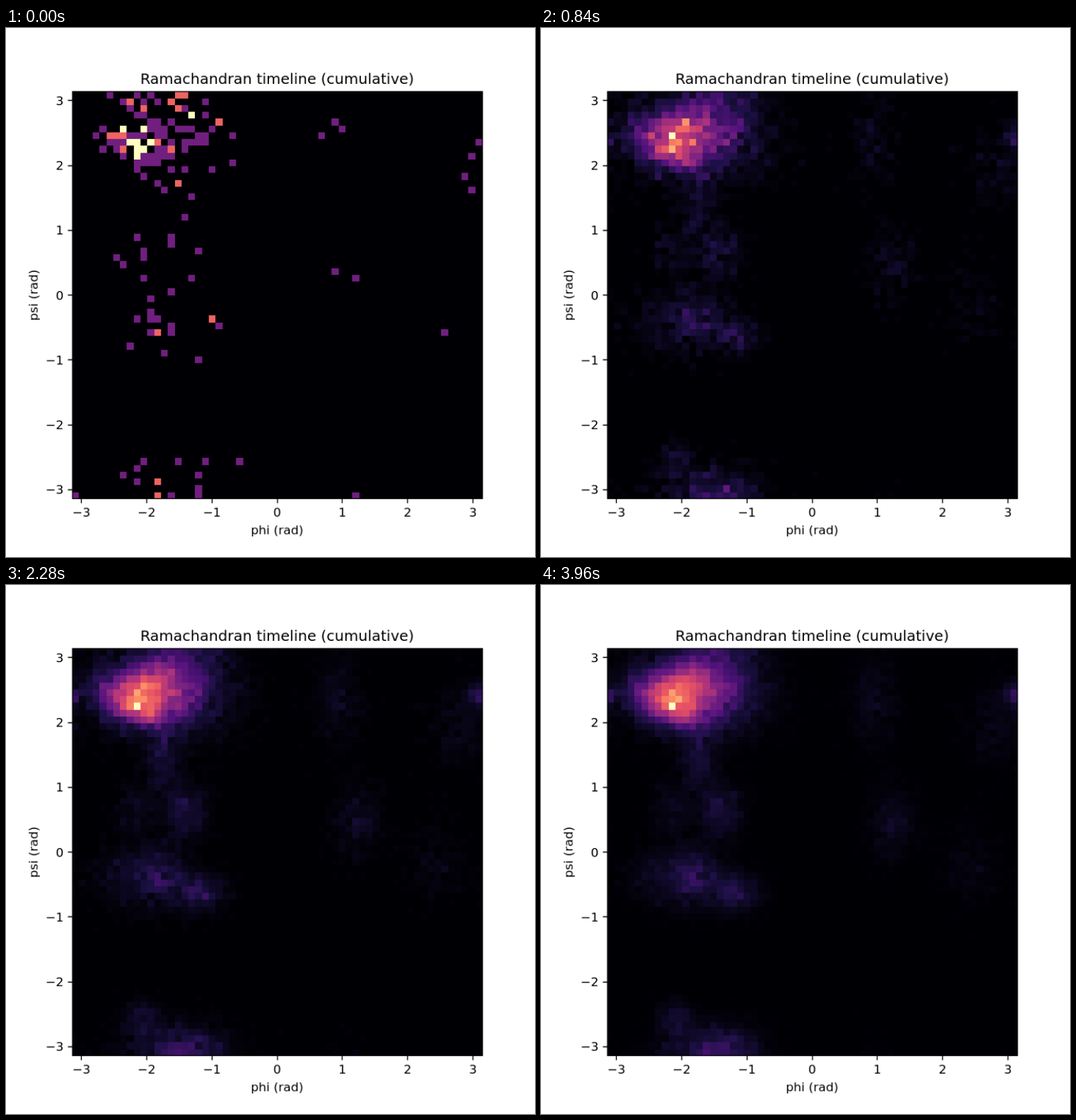
Recreate the animation shown at these times as an HTML page with a canvas. Size 748 by 748 pixels, loop 4.08 s.

```html
<!DOCTYPE html>
<html lang="en">
<head>
<meta charset="utf-8">
<title>Cumulative density</title>
<style>
html, body { margin: 0; width: 100%; height: 100%; overflow: hidden; background: #fff; }
canvas { display: block; width: 748px; height: 748px; }
</style>
</head>
<body>
<canvas id="stage" width="720" height="720"></canvas>
<script>
const ctx = document.getElementById('stage').getContext('2d');
const BINS = 60, STEPS = 34, STEP_MS = 120;
const FIRST_RATE = 1.6, FIRST_CAP = 3, RATE = 8;
const LEFT = 90, TOP = 86.4, WIDTH = 558, HEIGHT = 554.4;

// Density blobs in bins: weight, column, row, column spread, row spread
const blobs = [
  // main basin with its lobes and the hottest bin
  [.4, 12, 5.6, 4.2, 3.4], [.5, 8.2, 6.8, 2.6, 2], [.2, 11, 9.5, 2, 1.5], [.15, 11, 3.3, 2, 1.5],
  [.12, 17, 5, 4, 4], [.14, 4, 5.2, 1.6, 2.2], [.25, 9, 8, .3, .3],
  // bridge and lower basin
  [.1, 12.8, 16, 1.6, 3], [.12, 16, 23.5, 1.8, 2.5], [.05, 9, 23, 1.7, 2.5],
  [.14, 12.5, 33, 2.2, 2.5], [.14, 18, 35.3, 2.4, 1.8], [.07, 8, 33, 3, 2.5],
  // bottom edge
  [.1, 9.5, 54.5, 1.6, 1.8], [.14, 16, 58.2, 3, 2],
  // faint right half
  [.06, 41.2, 25.3, 1.9, 3], [.04, 38.5, 7, 2, 4], [.17, 59.3, 6.3, 1.2, 1.1],
  [.03, 56, 11, 2.5, 3.5], [.02, 53, 31, 2.5, 3.5]
];

let seed = 20177;
function random() {
  seed = (seed + 0x6D2B79F5) | 0;
  let t = Math.imul(seed ^ (seed >>> 15), 1 | seed);
  t = (t + Math.imul(t ^ (t >>> 7), 61 | t)) ^ t;
  return ((t ^ (t >>> 14)) >>> 0) / 4294967296;
}

function poisson(mean) {
  const limit = Math.exp(-mean);
  let n = 0;
  for (let p = random(); p > limit; p *= random()) n++;
  return n;
}

// Both angles are periodic, so distances wrap around the plot
function wrapped(a, b) {
  const d = Math.abs(a - b);
  return Math.min(d, BINS - d);
}

const density = Array.from({ length: BINS * BINS }, (_, i) => {
  const col = i % BINS, row = Math.floor(i / BINS);
  return blobs.reduce((sum, [weight, x, y, sx, sy]) =>
    sum + weight * Math.exp(-((wrapped(col, x) / sx) ** 2 + (wrapped(row, y) / sy) ** 2) / 2), 0);
});

const history = [density.map(d => Math.min(FIRST_CAP, poisson(FIRST_RATE * d)))];
for (let k = 1; k < STEPS; k++) {
  history.push(history[k - 1].map((n, i) => n + poisson(RATE * density[i])));
}

const ramp = ['#000004', '#1c1044', '#51127c', '#812581', '#b73779', '#e75263', '#fc8961', '#fec287', '#fcfdbf']
  .map(hex => [1, 3, 5].map(i => parseInt(hex.slice(i, i + 2), 16)));

function colour(value) {
  const pos = value * (ramp.length - 1);
  const i = Math.min(Math.floor(pos), ramp.length - 2);
  return `rgb(${ramp[i].map((c, j) => Math.round(c + (ramp[i + 1][j] - c) * (pos - i)))})`;
}

function text(label, x, y, align = 'center', size = 16.667) {
  ctx.font = `${size}px "DejaVu Sans", sans-serif`;
  ctx.textAlign = align;
  ctx.fillText(label, x, y);
}

function drawAxes() {
  const midX = LEFT + WIDTH / 2, midY = TOP + HEIGHT / 2;
  ctx.fillStyle = ctx.strokeStyle = '#000';
  ctx.lineWidth = 1.333;
  ctx.strokeRect(90.5, 86.5, 558, 554);
  for (let v = -3; v <= 3; v++) {
    const label = String(v).replace('-', '\u2212');
    const x = midX + v * WIDTH / (2 * Math.PI), y = midY - v * HEIGHT / (2 * Math.PI);
    const tickX = Math.floor(x) + .5, tickY = Math.floor(y) + .5;
    ctx.beginPath();
    ctx.moveTo(tickX, 641);
    ctx.lineTo(tickX, 646.8);
    ctx.moveTo(90, tickY);
    ctx.lineTo(84.2, tickY);
    ctx.stroke();
    text(label, x, 665);
    text(label, 78.4, Math.round(y + 6), 'right');
  }
  text('Ramachandran timeline (cumulative)', midX, 76, 'center', 20);
  text('phi (rad)', midX, 689);
  ctx.save();
  ctx.translate(43, midY);
  ctx.rotate(-Math.PI / 2);
  text('psi (rad)', 0, 0);
  ctx.restore();
}

function draw(counts) {
  const max = Math.max(...counts);
  const edgeX = col => Math.round(LEFT + col * WIDTH / BINS);
  const edgeY = row => Math.round(TOP + row * HEIGHT / BINS);
  ctx.fillStyle = '#fff';
  ctx.fillRect(0, 0, 720, 720);
  counts.forEach((n, i) => {
    const col = i % BINS, row = Math.floor(i / BINS);
    const x = edgeX(col), y = edgeY(row);
    ctx.fillStyle = colour(n / max);
    ctx.fillRect(x, y, edgeX(col + 1) - x, edgeY(row + 1) - y);
  });
  drawAxes();
}

let shown = -1;
function tick() {
  const step = Math.floor(performance.now() / STEP_MS) % STEPS;
  if (step !== shown) draw(history[shown = step]);
  requestAnimationFrame(tick);
}
tick();
</script>
</body>
</html>
```
